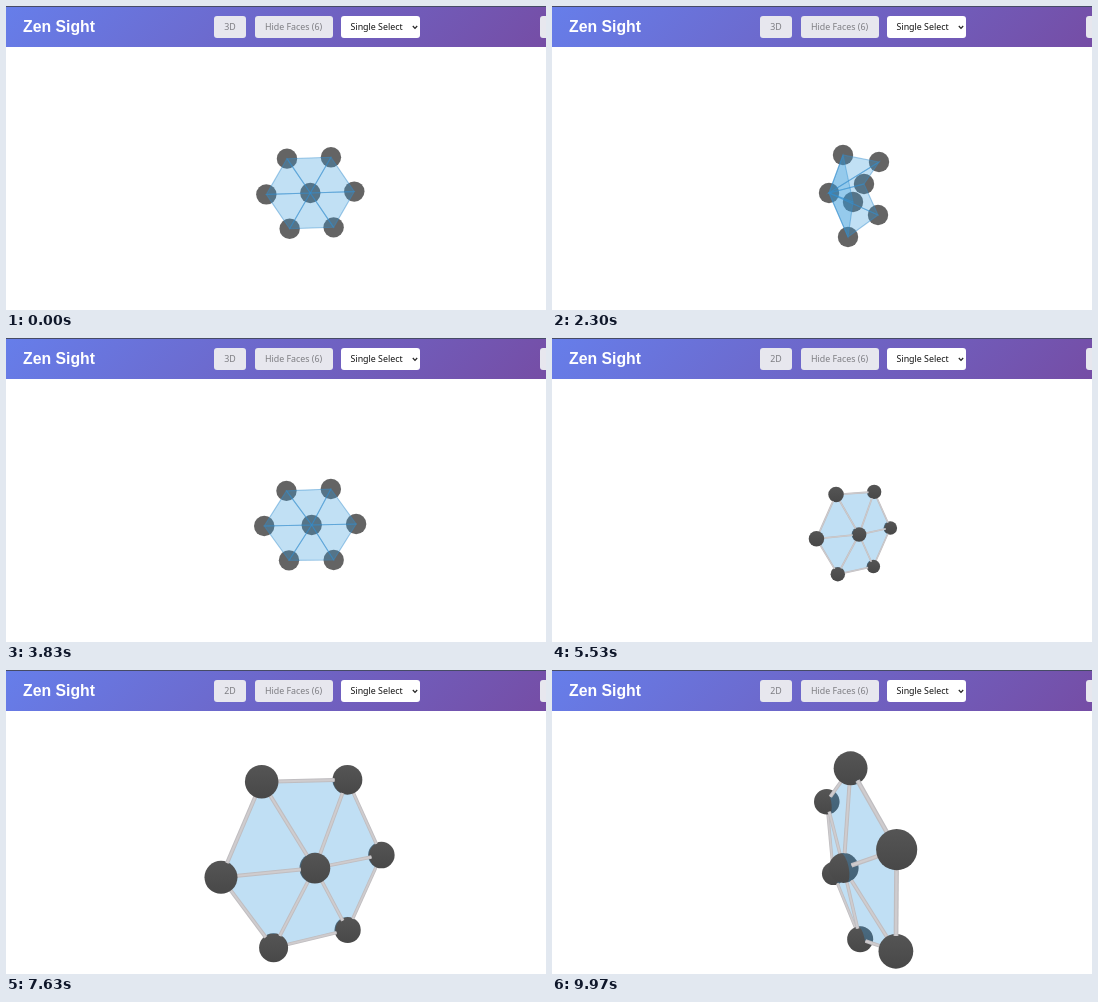
Write an HTML page with a canvas that moves like this. It is 540 px wide and 304 px high and loops after 10000 ms.

```html
<!DOCTYPE html>
<html lang="en">
<head>
<meta charset="utf-8">
<title>Zen Sight</title>
<style>
  html, body { margin: 0; width: 100%; height: 100%; overflow: hidden; background: #fff; }
  canvas { display: block; }
  header {
    position: absolute; left: 0; top: 0; width: 100%; height: 41px; overflow: hidden;
    background: linear-gradient(135deg, #667eea, #764ba2) 0 0 / 565px 41px;
    font: 8.85px "Noto Sans", sans-serif;
  }
  header::before { content: ""; position: absolute; width: 100%; height: 1px; background: #464b66; }
  h1 {
    position: absolute; left: 17px; top: 11px; margin: 0; color: #fff;
    font: bold 15.8px/20px "Liberation Sans", Arial, sans-serif; white-space: nowrap;
  }
  .btn {
    position: absolute; top: 10px; height: 22px; line-height: 22px; border-radius: 3px;
    background: #e7e7ee; color: #7d7d82; text-align: center; white-space: nowrap;
  }
  #mode { left: 208px; width: 32px; }
  #faces { left: 248.5px; width: 78px; }
  #select { left: 335px; width: 79px; background: #fff; color: #111; text-align: left; text-indent: 9.5px; }
  #select svg { position: absolute; right: 2.5px; top: 9px; }
  #more { left: 533.5px; width: 6.5px; border-radius: 3px 0 0 3px; }
  .hover #mode { left: 206.5px; }
  .hover #faces { left: 247px; top: 9px; width: 81px; background: #c4c6d0; color: #1c1c1c; }
  .hover #select { left: 337px; }
</style>
</head>
<body>
<canvas id="stage" width="540" height="304"></canvas>
<header id="bar">
  <h1>Zen Sight</h1>
  <div class="btn" id="mode">3D</div>
  <div class="btn" id="faces">Hide Faces (6)</div>
  <div class="btn" id="select">Single Select
    <svg width="6" height="5"><path d="M.8 1 3 3.4 5.2 1" fill="none" stroke="#222" stroke-width="1.2"/></svg>
  </div>
  <div class="btn" id="more"></div>
</header>
<script>
const ctx = document.getElementById('stage').getContext('2d');
const bar = document.getElementById('bar');
const modeButton = document.getElementById('mode');
const facesButton = document.getElementById('faces');

// Node 0 is the hub; 1 to 6 form the ring, clockwise from the right
const ring = [1, 2, 3, 4, 5, 6];
const next = i => i % 6 + 1;
const edges = ring.flatMap(i => [[0, i], [i, next(i)]]);

const mix = (a, b, k) => a + (b - a) * k;
function ease(t, from, to) {
  const u = Math.min(1, Math.max(0, (t - from) / (to - from)));
  return u * u * (3 - 2 * u);
}
function polygon(points) {
  const path = new Path2D();
  points.forEach(p => path.lineTo(p.x, p.y));
  path.closePath();
  return path;
}
function disc({ x, y, r }, color) {
  ctx.fillStyle = color;
  ctx.beginPath();
  ctx.arc(x, y, r, 0, 7);
  ctx.fill();
}

// Where the nodes settle while the hub is dragged to the left
const pulled = [[277, 187], [312, 178], [326, 209], [296, 231], [301, 196], [291, 149], [327, 156]];

function draw2D(t) {
  const dt = t - 2.35;
  const pull = dt < 0 ? ease(t, .2, 1.5) : Math.exp(-2 * dt) * Math.cos(Math.PI * dt / .296);
  const nodes = pulled.map(([x, y], i) => {
    const angle = (i - 1) * Math.PI / 3 - .035, size = i ? 1 : 0;
    return {
      x: mix(304.3 + 44 * size * Math.cos(angle), x, pull),
      y: mix(187 + 40.5 * size * Math.sin(angle), y, pull),
      r: 10.2
    };
  });
  nodes.forEach(node => disc(node, '#646464'));
  ctx.fillStyle = 'rgba(52,152,219,.3)';
  ctx.strokeStyle = 'rgba(52,140,205,.45)';
  ctx.lineWidth = 1.1;
  for (const i of ring) {
    const face = polygon([nodes[0], nodes[i], nodes[next(i)]]);
    ctx.fill(face);
    ctx.stroke(face);
  }
}

// Hexagon in space, spanned by two neighbouring spokes; the hub stands out a little
const U = [85, -11, 0], V = [52, 73, -17], HUB = [0, 3, 13];
const span = (a, b) => U.map((u, j) => a * u + b * V[j]);
const model = [HUB, span(1, 0), span(0, 1), span(-1, 1), span(-1, 0), span(0, -1), span(1, -1)];

function project([x, y, z], yaw, zoom) {
  const c = Math.cos(yaw), s = Math.sin(yaw);
  const scale = zoom / (1 - zoom * (x * s + z * c) / 280);
  return { x: 304 + scale * (x * c - z * s), y: 195 + scale * y, r: 14.7 * scale };
}

function drawRod(a, b) {
  const trim = .15, width = .25 * (a.r + b.r) / 2;
  ctx.beginPath();
  ctx.moveTo(mix(a.x, b.x, trim), mix(a.y, b.y, trim));
  ctx.lineTo(mix(b.x, a.x, trim), mix(b.y, a.y, trim));
  for (const [color, share] of [['#bfbdc0', 1], ['#cfccce', .5]]) {
    ctx.strokeStyle = color;
    ctx.lineWidth = width * share;
    ctx.stroke();
  }
}

function drawSphere(node) {
  const shade = ctx.createLinearGradient(0, node.y - node.r, 0, node.y + node.r);
  shade.addColorStop(0, '#555');
  shade.addColorStop(1, '#484848');
  disc(node, shade);
}

// Crescent of a sphere that lies behind the turned plane
function tintBehind({ x, y, r }, yaw) {
  ctx.save();
  ctx.translate(x, y);
  ctx.scale(Math.sign(yaw) || 1, 1);
  ctx.rotate(-.2);
  ctx.beginPath();
  ctx.arc(0, 0, r, -Math.PI / 2, Math.PI / 2);
  ctx.ellipse(0, 0, r * Math.cos(yaw), r, 0, Math.PI / 2, -Math.PI / 2, true);
  ctx.fill();
  ctx.restore();
}

function draw3D(t, showFaces) {
  const faceColor = 'rgba(52,152,219,.31)';
  const zoom = mix(.49, 1, ease(t, 5.55, 6.4));
  const degrees = -28 + 53 * ease(t, 7.4, 8.43) + 45 * ease(t, 9.47, 9.97);
  const yaw = degrees * Math.PI / 180;
  const push = ease(t, 6.6, 7.05) * (1 - ease(t, 7.1, 7.45));
  const nodes = model.map(p => project(p, yaw, zoom));
  const stretch = 1 + .05 * push;
  const hexagon = polygon(ring.map(i => project(model[i].map(v => v * stretch), yaw, zoom)));
  nodes[1].x -= 31 * push; // the right node is dragged behind the faces

  const items = [
    ...nodes.map((node, i) => ({ node, ends: [i], depth: node.r, draw: () => drawSphere(node) })),
    ...edges.map(ends => {
      const [a, b] = ends.map(i => nodes[i]);
      return { ends, depth: (a.r + b.r) / 2, draw: () => drawRod(a, b) };
    })
  ].sort((a, b) => a.depth - b.depth);
  const isBehind = item => push > .02 && item.ends.includes(1);

  items.filter(isBehind).forEach(item => item.draw());
  if (showFaces) {
    ctx.fillStyle = faceColor;
    ctx.fill(hexagon);
  }
  for (const item of items.filter(item => !isBehind(item))) {
    item.draw();
    if (!item.node || !showFaces) continue;
    ctx.save();
    ctx.clip(hexagon);
    ctx.fillStyle = faceColor;
    tintBehind(item.node, yaw);
    ctx.restore();
  }
}

function setText(element, text) {
  if (element.textContent !== text) element.textContent = text;
}

function render() {
  const t = performance.now() % 10000 / 1000;
  const is3D = t >= 4.9;
  const hidden = t >= 8.53 && t < 9.3;
  bar.className = hidden ? 'hover' : '';
  setText(modeButton, is3D ? '2D' : '3D');
  setText(facesButton, hidden ? 'Show Faces (6)' : 'Hide Faces (6)');
  ctx.clearRect(0, 0, 540, 304);
  if (is3D) draw3D(t, !hidden);
  else draw2D(t);
  requestAnimationFrame(render);
}
render();
</script>
</body>
</html>
```
